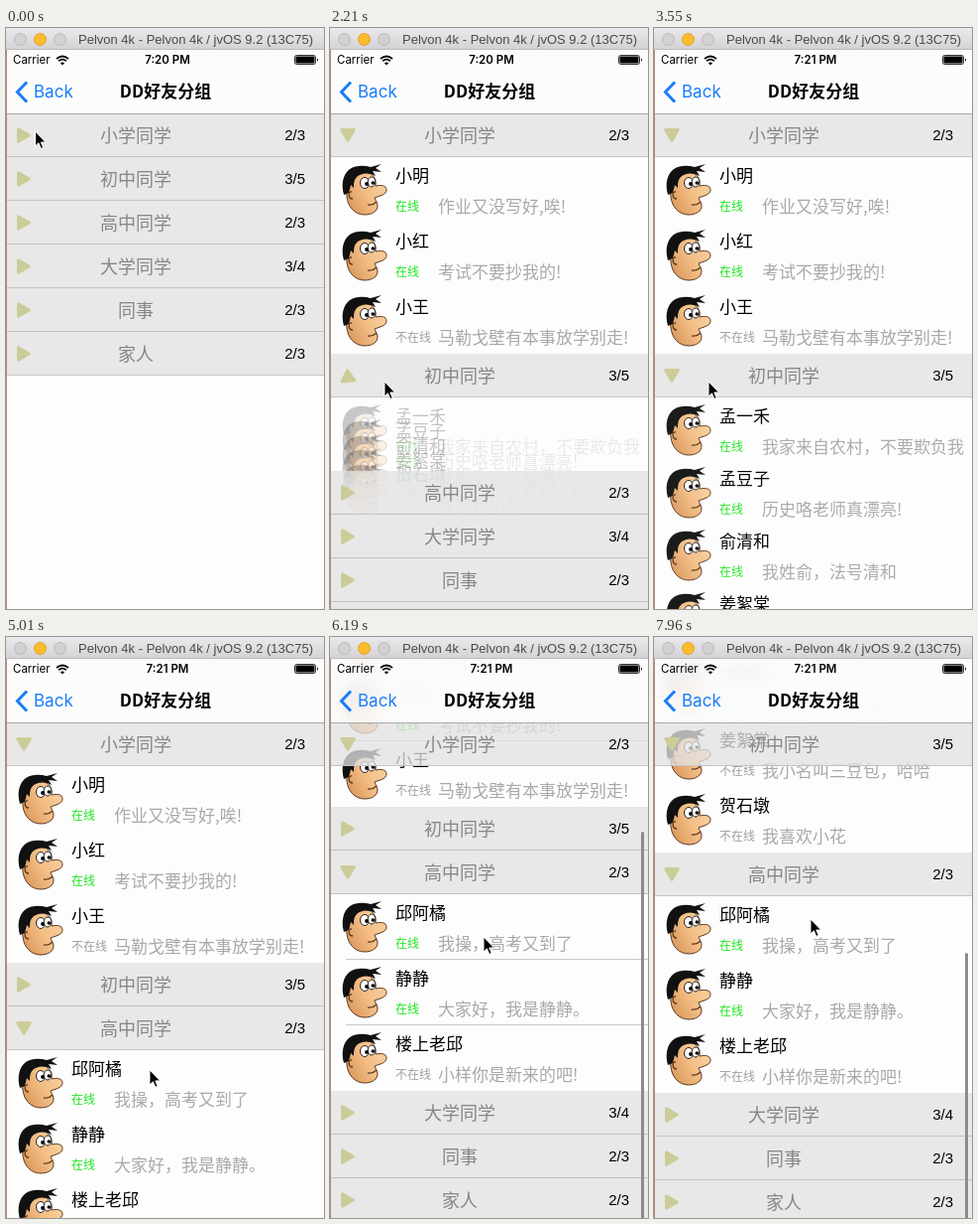
These frames come from a looping animation (321x585 px, 8000 ms). An HTML page:

```html
<!DOCTYPE html>
<html lang="zh-CN">
<head>
<meta charset="utf-8">
<title>好友分组</title>
<style>
html, body { margin: 0; width: 100%; height: 100%; overflow: hidden; background: #fff; }
#stage { position: relative; width: 321px; height: 585px; overflow: hidden; background: #fdfdfd;
  font-family: "Noto Sans CJK SC", "Noto Sans CJK JP", "Noto Sans CJK", sans-serif; }
#stage div, #stage svg { position: absolute; white-space: nowrap; }
.edge { left: 0; top: 22px; width: 1px; height: 563px; background: #b98a78; }
.table { left: 1px; top: 0; width: 320px; height: 585px; overflow: hidden; }
.body { left: 0; top: 0; width: 320px; }
.row { left: 0; top: 0; width: 320px; height: 66px; }
.row svg { left: 10px; top: 6px; }
.name { left: 65px; top: 6px; font-size: 17px; line-height: 24px; color: #000; }
.state { left: 65px; top: 39px; font-size: 12px; line-height: 20px; color: #a0a0a0; }
.state.on { color: #1fe61f; }
.note { left: 108px; top: 37px; font-size: 17px; line-height: 24px; color: #a9a9a9; }
.line { left: 15px; right: 0; bottom: 0; height: 1px; background: #c8c8c8; }
.head { left: 0; top: 0; width: 320px; height: 43px; background: rgba(227,227,227,.77);
  border-bottom: 1px solid #c4c4c4; }
.head svg { left: 7px; top: 12px; }
.title { left: 0; width: 260px; top: 7px; text-align: center; font-size: 18px; line-height: 28px; color: #868686; }
.count { right: 19px; top: 12px; font: 15px/20px "Liberation Sans", sans-serif; color: #000; }
#thumb { left: 314px; top: 0; width: 3px; border-radius: 2px; background: #8c8c8c; }
.nav { left: 1px; top: 22px; width: 320px; height: 64px; background: rgba(252,252,252,.9);
  backdrop-filter: blur(10px); border-bottom: 1px solid #a9a9a9; }
.carrier { left: 6px; top: 3px; font: 11.5px/15px Inter, sans-serif; }
#clock { left: 102px; width: 120px; top: 3px; text-align: center; font: 600 11.5px/15px Inter, sans-serif; }
.back { left: 27px; top: 31px; font: 17px/22px Inter, sans-serif; color: #1a7dfa; }
.heading { left: 60px; width: 200px; top: 29px; text-align: center; font-size: 17px; line-height: 24px; font-weight: 700; }
.bar { left: 0; top: 0; width: 321px; height: 22px; background: linear-gradient(#ebe9eb, #d3d1d3);
  box-shadow: inset 0 -1px #bcbabc; }
.bar i { position: absolute; top: 5px; width: 11px; height: 11px; border-radius: 50%;
  background: #d2d0d2; border: 1px solid #bbb9bb; }
.caption { left: 70px; width: 243px; top: 3px; text-align: center; font: 13px/17px "Liberation Sans", sans-serif; color: #4a4a4a; }
</style>
</head>
<body>
<div id="stage">
  <svg width="0" height="0">
    <defs>
      <linearGradient id="skin" x1="0" y1=".8" x2="1" y2=".2">
        <stop offset="0" stop-color="#d9965a"/><stop offset=".5" stop-color="#f3bd84"/><stop offset="1" stop-color="#f9d2a2"/>
      </linearGradient>
      <symbol id="face" viewBox="0 0 47 54">
        <path d="M10 16C6 22 5 28 6 34C7 44 14 52 24 52C32 52 37 48 37 43C37 40 35 38 34 35C39 33 46 32 46 27C46 22 40 22 35 23C36 15 32 10 24 9C18 9 13 11 10 16Z" fill="url(#skin)" stroke="#5c3a20"/>
        <path d="M3 32C0 22 2 11 9 6C15 2 23 2 30 4L41 1L35 5L41 9L32 8L35 13C28 9 20 10 16 14C13 17 13 21 13 25L10 22L8 30Z" fill="#111"/>
        <ellipse cx="24" cy="20" rx="4.5" ry="5.5" fill="#fff" stroke="#222"/>
        <ellipse cx="31" cy="19" rx="3.8" ry="5" fill="#fff" stroke="#222"/>
        <circle cx="26" cy="21" r="1.9"/><circle cx="32.3" cy="20" r="1.8"/>
        <path d="M27 42Q32 43 36 39M11 29C7 28 7 36 12 36" fill="none" stroke="#5c3a20" stroke-width="1.3"/>
      </symbol>
    </defs>
  </svg>
  <div class="edge"></div>
  <div class="table" id="table"></div>
  <div id="thumb"></div>
  <div class="nav">
    <div class="carrier">Carrier</div>
    <svg style="left:49px;top:5px" width="14" height="11" viewBox="0 0 14 11" fill="none" stroke="#000" stroke-width="1.8">
      <path d="M1 4Q7 -1 13 4M3.2 6.3Q7 3 10.8 6.3"/><path d="M7 10.5L4.9 8.3Q7 6.6 9.1 8.3Z" fill="#000" stroke="none"/>
    </svg>
    <div id="clock"></div>
    <svg style="left:290px;top:5px" width="26" height="11">
      <rect x=".5" y=".5" width="21" height="9" rx="2" fill="none" stroke="#000" stroke-width=".8"/>
      <rect x="1.5" y="1.5" width="19" height="7" rx="1"/><path d="M23 3.2q2 1.8 0 3.6z"/>
    </svg>
    <svg style="left:8px;top:31px" width="14" height="23" fill="none" stroke="#1a7dfa" stroke-width="3"><path d="M12 1.5L2.5 11.5L12 21.5"/></svg>
    <div class="back">Back</div>
    <div class="heading">DD好友分组</div>
  </div>
  <div class="bar">
    <i style="left:8px"></i><i style="left:28px;background:#fdbc2e;border-color:#e2a02a"></i><i style="left:48px"></i>
    <div class="caption">Pelvon 4k - Pelvon 4k / jvOS 9.2 (13C75)</div>
  </div>
  <svg id="pointer" style="left:0;top:0" width="14" height="21" viewBox="-1 -1 14 21">
    <path d="M0 0V15L3.4 11.8L5.8 17.4L8.2 16.4L5.8 11H10.6Z" fill="#000" stroke="#fff"/>
  </svg>
</div>
<script>
const LOOP = 8000, STEP = 147.4, TOP = 86, HEAD = 44, ROW = 66, VIEW = 504;

// Each friend: name, note, online
const groups = [
  ["小学同学", "2/3", [["小明", "作业又没写好,唉!", 1], ["小红", "考试不要抄我的!", 1], ["小王", "马勒戈壁有本事放学别走!", 0]]],
  ["初中同学", "3/5", [["孟一禾", "我家来自农村，不要欺负我", 1], ["孟豆子", "历史咯老师真漂亮!", 1],
    ["俞清和", "我姓俞，法号清和", 1], ["姜絮棠", "我小名叫三豆包，哈哈", 0], ["贺石墩", "我喜欢小花", 0]]],
  ["高中同学", "2/3", [["邱阿橘", "我操，高考又到了", 1], ["静静", "大家好，我是静静。", 1], ["楼上老邱", "小样你是新来的吧!", 0]]],
  ["大学同学", "3/4", []], ["同事", "2/3", []], ["家人", "2/3", []]
];

// Taps: group, start time, opens
const taps = [[0, 795, 1], [1, 2119, 1], [1, 2707, 0], [1, 3276, 1], [1, 3679, 0], [2, 4640, 1], [1, 6690, 1]];

const scrollKeys = [[5012, 0], [5160, 16], [5307, 68], [5454, 136], [5602, 184], [5750, 188],
  [5900, 171], [6044, 161], [6191, 157.5], [6338, 156], [7371, 156], [7517, 204], [7665, 330], [7812, 440], [7959, 485]];
const pointerKeys = [[148, 29.5, 104], [590, 126, 140], [737, 126, 140], [884, 112, 118], [1326, 112, 118],
  [1916, 55, 356], [4275, 55, 356], [4570, 130, 392], [4864, 140, 396], [5012, 145, 436], [5160, 146, 420],
  [5307, 150, 370], [5454, 155, 302], [6191, 155, 302], [6486, 178, 196], [6930, 178, 196], [7370, 174, 410],
  [7517, 170, 364], [7665, 163, 312], [7812, 158, 284]];
const barKeys = [[5012, 0], [5160, 1], [6338, 1], [6780, 0], [7371, 0], [7517, 1]];

const $ = id => document.getElementById(id);
const clamp = x => Math.max(0, Math.min(1, x));
const ease = x => x * x * (3 - 2 * x);

function sample(keys, t) {
  const next = keys.findIndex(k => k[0] > t);
  if (next === 0) return keys[0].slice(1);
  if (next < 0) return keys[keys.length - 1].slice(1);
  const a = keys[next - 1], b = keys[next], f = (t - a[0]) / (b[0] - a[0]);
  return a.slice(1).map((v, i) => v + (b[i + 1] - v) * f);
}

function add(parent, className, html = "") {
  const el = document.createElement("div");
  el.className = className;
  el.innerHTML = html;
  return parent.appendChild(el);
}

const sections = groups.map(([, , friends]) => {
  const body = add($("table"), "body");
  const rows = friends.map(([name, note, online]) => add(body, "row",
    `<svg width="47" height="54"><use href="#face"/></svg><div class="name">${name}</div>
     <div class="state ${online ? "on" : ""}">${online ? "在线" : "不在线"}</div>
     <div class="note">${note}</div><div class="line"></div>`));
  return { body, rows };
});
groups.forEach(([title, count], i) => {
  const head = add($("table"), "head",
    `<svg width="20" height="20" viewBox="-10 -10 20 20"><path d="M-5.5 -6.3L5.3 0L-5.5 6.3Z" fill="#cccc99" stroke="#cccc99" stroke-width="3" stroke-linejoin="round"/></svg>
     <div class="title">${title}</div><div class="count">${count}</div>`);
  Object.assign(sections[i], { head, arrow: head.querySelector("path") });
});

// How far a group is open after the given animation length
function openness(group, t, duration) {
  const tap = taps.filter(k => k[0] === group && k[1] <= t).pop();
  if (!tap) return 0;
  const f = clamp((t - tap[1]) / duration);
  return tap[2] ? f : 1 - f;
}

const moveTo = (el, x, y) => { el.style.transform = `translate(${x}px, ${y}px)`; };

function draw(t) {
  const offset = Math.round(sample(scrollKeys, t)[0] * 2) / 2;
  const hairlines = offset % 1 ? "visible" : "hidden";
  const tops = [TOP];
  sections.forEach(({ body, rows, arrow }, i) => {
    const p = ease(openness(i, t, 300));
    moveTo(body, 0, Math.round(tops[i] + HEAD - offset));
    rows.forEach((row, n) => {
      moveTo(row, 0, Math.round(n * ROW * p));
      row.style.opacity = p;
      row.lastChild.style.visibility = n < rows.length - 1 ? hairlines : "hidden";
    });
    arrow.setAttribute("transform", `rotate(${-270 * openness(i, t, 260)})`);
    tops.push(tops[i] + HEAD + rows.length * ROW * p);
  });
  sections.forEach(({ head }, i) => {
    const pinned = Math.min(TOP, tops[i + 1] - offset - HEAD * (i < 5));
    moveTo(head, 0, Math.round(Math.max(tops[i] - offset, pinned)));
  });

  const total = tops[sections.length] - TOP, limit = Math.max(1, total - VIEW);
  const over = Math.max(0, offset - limit);
  const length = Math.min(VIEW, VIEW * (VIEW + 64) / (total + 64)) - over;
  moveTo($("thumb"), 0, TOP + (VIEW - length) * clamp(offset / limit));
  $("thumb").style.height = length + "px";
  $("thumb").style.opacity = sample(barKeys, t)[0];

  const [x, y] = sample(pointerKeys, t);
  moveTo($("pointer"), x - 1, y - 1);
  $("clock").textContent = t < 2795 ? "7:20 PM" : "7:21 PM";
}

// The screen refreshes in coarse steps, as in a recording.
function tick() {
  const t = performance.now() % LOOP;
  draw(Math.floor((t + 13) / STEP) * STEP);
  requestAnimationFrame(tick);
}
tick();
</script>
</body>
</html>
```
